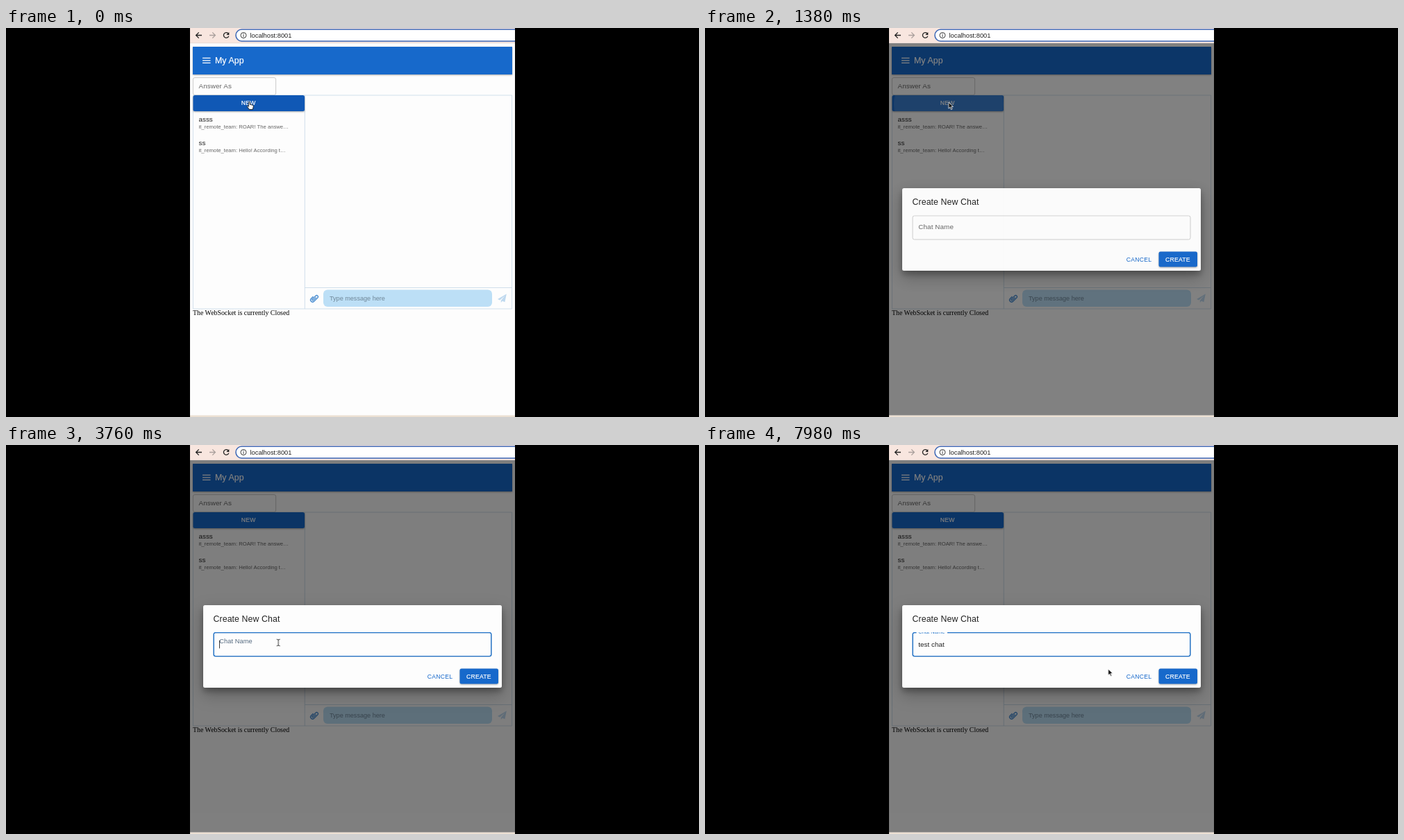
These frames come from a looping animation (998x561 px, 8 s). An HTML page:

```html
<!DOCTYPE html>
<html lang="en">
<head>
<meta charset="utf-8">
<title>Create chat dialog</title>
<style>
  html, body { margin: 0; width: 100%; height: 100%; overflow: hidden; background: #000; }
  svg { display: block; width: 998px; height: 561px; }
  text { font-family: "Liberation Sans", Arial, sans-serif; font-size: 9.87px; fill: #222; white-space: pre; }
  .title { font-size: 12.34px; letter-spacing: .0075em; }
  .button { font-size: 8.64px; letter-spacing: .02857em; }
  .light { fill: #fff; stroke: #fff; stroke-width: .2px; }
  .preview { font-size: 7.7px; fill: #666; }
  .address { font-size: 9.3px; }
  .hint { font-size: 9.1px; fill: #6f8798; }
  .status { font-family: "Liberation Serif", Times, serif; fill: #000; }
  .label { letter-spacing: .0094em; fill: #666; }
  .line { fill: none; stroke: #c6d8e7; stroke-width: .8px; }
  .icon { fill: none; stroke: #222; stroke-width: 1.3px; }
  .raised { filter: drop-shadow(0 1px 1px #0005); }
  .sheet { filter: drop-shadow(0 5px 4px #0004) drop-shadow(0 8px 11px #0004); }
  #notch { transform-box: fill-box; transform-origin: left; }
</style>
</head>
<body>
<svg viewBox="0 0 998 561">
  <defs>
    <clipPath id="window"><rect x="265" width="468" height="561"/></clipPath>
    <clipPath id="newButton"><rect x="269.5" y="97" width="160.5" height="23" rx="2.5"/></clipPath>
    <clipPath id="content"><rect x="284" y="270.2" width="430" height="45"/></clipPath>
  </defs>
  <rect width="998" height="561" fill="#000"/>
  <g clip-path="url(#window)">
    <rect x="265" width="468" height="561" fill="#fdfdfd"/>

    <!-- browser bar -->
    <rect x="265" width="468" height="22" fill="#f8e6df"/>
    <rect x="265" y="21.3" width="468" height=".8" fill="#e3d9d4"/>
    <rect x="265" y="558.5" width="468" height="3" fill="#ece0d3"/>
    <rect x="331" y="2" width="440" height="17" rx="8.5" fill="#fff" stroke="#3b66b5" stroke-width="1.5"/>
    <path class="icon" d="M282 10.5H273.8M277.7 6.4L273.6 10.5L277.7 14.6"/>
    <path class="icon" style="stroke:#aaa09d" d="M293 10.5H301.2M297.3 6.4L301.4 10.5L297.3 14.6"/>
    <path class="icon" d="M320 7.8A3.8 3.8 0 1 0 320.8 11.6"/>
    <path d="M321.3 6V10H317.3Z" fill="#222"/>
    <g class="icon" style="stroke-width:.9px">
      <circle cx="342" cy="10.5" r="4"/><path d="M342 9.8V12.8M342 8V9"/>
    </g>
    <text class="address" x="351.5" y="13.7">localhost:8001</text>

    <!-- app -->
    <rect class="raised" x="269" y="27" width="460" height="40" fill="#1769cb"/>
    <path class="icon" style="stroke:#fff" d="M283 43.3H294.5M283 46.8H294.5M283 50.3H294.5"/>
    <text class="title light" x="301" y="51">My App</text>
    <rect x="269.4" y="71.6" width="119.2" height="25" rx="2.5" fill="none" stroke="#bdbdbd" stroke-width=".8"/>
    <text class="label" x="277.5" y="87.2">Answer As</text>
    <path class="line" d="M269.4 97H728.6V405H269.4ZM430.3 97V405M430.3 374.5H728.6"/>
    <rect id="newFill" class="raised" x="269.5" y="97" width="160.5" height="23" rx="2.5" fill="#1058b5"/>
    <text class="button light" x="338.8" y="111.2">NEW</text>
    <g clip-path="url(#newButton)">
      <g transform="translate(351 110)"><circle id="ripple" r="84" fill="#fff"/></g>
    </g>
    <text x="277.5" y="135.4">asss</text>
    <text class="preview" x="277.5" y="144.7">it_remote_team: ROAR! The answe…</text>
    <text x="277.5" y="169.4">ss</text>
    <text class="preview" x="277.5" y="178.7">it_remote_team: Hello! According t…</text>
    <rect x="457" y="377.5" width="243" height="24.5" rx="6" fill="#bcdff6"/>
    <text class="hint" x="466" y="392.6">Type message here</text>
    <g transform="translate(443.8 390) rotate(45)" fill="none" stroke="#4c8fd2" stroke-width="1.4">
      <path d="M-2.9 -1V3.2A2.9 2.9 0 0 0 2.9 3.2V-4.2A2 2 0 0 0 -1.1 -4.2V2.6A1 1 0 0 0 .9 2.6V-3"/>
    </g>
    <path d="M720.8 383.5L708 391L711.2 392.4L718.6 386L712.8 393V396L714.8 393.8L718.4 395.3Z" fill="#bfd9ef"/>
    <text class="status" x="269" y="414">The WebSocket is currently Closed</text>

    <rect id="backdrop" x="265" y="22" width="468" height="536.5" fill="#000"/>

    <g id="dialog">
      <rect class="sheet" x="284" y="231" width="430" height="119" rx="2.5" fill="#fdfdfd"/>
      <text class="title" x="298.5" y="255">Create New Chat</text>
      <g clip-path="url(#content)">
        <rect x="299" y="270.8" width="400" height="34.2" rx="2.5" fill="none" stroke="#c2c2c2" stroke-width=".8"/>
        <rect id="focus" x="299.2" y="270.6" width="399.6" height="34" rx="2.5" fill="none" stroke="#1f72c9" stroke-width="1.4"/>
        <rect id="notch" x="304.5" y="269" width="44.5" height="3" fill="#fdfdfd"/>
        <g transform="translate(307.3 279.9)"><text id="label" class="label" y="10.6">Chat Name</text></g>
        <text id="typed" x="307.3" y="290.6">test chat</text>
        <rect id="caret" x="307" y="281.8" width=".9" height="11.5" fill="#222"/>
      </g>
      <text class="button" x="606.8" y="336.6" style="fill:#1769cb">CANCEL</text>
      <rect class="raised" x="653.5" y="322.5" width="55.5" height="22" rx="2.5" fill="#1769cb"/>
      <text class="button light" x="663" y="336.6">CREATE</text>
    </g>

    <g id="pointer">
      <path id="hand" d="M-1.4 .4C-1.4 -.8 .5 -.8 .6 .4V3.3L4.4 4.2C5.6 4.6 5.6 5.6 5.3 7L4.4 10.6H-.3L-3.4 6.6C-3.7 5.6 -2.5 5.1 -1.4 6.4Z" fill="#fff" stroke="#111" stroke-width=".9"/>
      <path id="arrow" d="M0 0V9.2L2.1 7.2L3.6 10.6L5.2 9.9L3.7 6.6H6.6Z" fill="#111" stroke="#fff" stroke-width=".8"/>
      <path id="beam" d="M-2.4 -4.8Q0 -4.8 0 -3.3Q0 -4.8 2.4 -4.8M0 -3.6V3.6M-2.4 4.8Q0 4.8 0 3.3Q0 4.8 2.4 4.8" fill="none" stroke="#222" stroke-width=".9"/>
    </g>
  </g>
</svg>
<script>
const LOOP = 8000;
const STANDARD = 'cubic-bezier(.4,0,.2,1)';
const DECELERATE = 'cubic-bezier(0,0,.2,1)';
const $ = id => document.getElementById(id);

// Each step is [time in ms, value, easing to the next step].
function play(node, property, steps, ease = 'linear') {
  const all = [[0, steps[0][1]], ...steps, [LOOP, steps[steps.length - 1][1]]];
  node.animate(all.map(([time, value, easing = ease]) =>
    ({ offset: time / LOOP, [property]: value, easing })),
    { duration: LOOP, iterations: Infinity });
}
const toggle = (node, property, steps) =>
  play(node, property, [[0, 0], ...steps], 'step-end');
const at = (x, y) => `translate(${x}px, ${y}px)`;

// Dialog opening
const OPEN = 1195;
play($('backdrop'), 'opacity', [[OPEN, 0, STANDARD], [OPEN + 225, .5]]);
play($('dialog'), 'opacity', [[OPEN, 0, STANDARD], [OPEN + 225, 1]]);
play($('newFill'), 'fill', [[OPEN, '#1058b5', STANDARD], [OPEN + 250, '#1769cb']]);
play($('ripple'), 'transform', [[1000, 'scale(0)', STANDARD], [1550, 'scale(1)']]);
play($('ripple'), 'opacity', [[1000, .1], [OPEN, .3, STANDARD], [OPEN + 550, 0]]);

// Field focus
const FOCUS = 3745;
toggle($('focus'), 'opacity', [[FOCUS, 1]]);
play($('notch'), 'transform', [[FOCUS + 50, 'scaleX(0)', DECELERATE], [FOCUS + 150, 'scaleX(1)']]);
play($('label'), 'transform',
  [[FOCUS, at(0, 0) + ' scale(1)', DECELERATE], [FOCUS + 200, at(0, -15.4) + ' scale(.75)']]);
play($('label'), 'fill', [[FOCUS, '#666', DECELERATE], [FOCUS + 200, '#1f72c9']]);

// Typing
const keys = [4860, 5060, 5200, 5380, 5560, 5840, 5980, 6180, 6400];
const typed = $('typed');
const letters = [...typed.textContent];
const caretSteps = [[0, at(0, 0)], ...keys.map((time, i) =>
  [time, at(typed.getSubStringLength(0, i + 1), 0)])];
play($('caret'), 'transform', caretSteps, 'step-end');
typed.textContent = '';
letters.forEach((letter, i) => {
  const span = document.createElementNS(typed.namespaceURI, 'tspan');
  span.textContent = letter;
  typed.append(span);
  toggle(span, 'fillOpacity', [[keys[i], 1]]);
});
const last = keys[keys.length - 1];
toggle($('caret'), 'opacity', [[FOCUS, 1], [FOCUS + 500, 0], [keys[0], 1],
  [last + 500, 0], [last + 1000, 1], [last + 1500, 0]]);

// Pointer
const GLIDE = 'cubic-bezier(.4,0,.4,1)';
play($('pointer'), 'transform', [[2560, at(350.8, 107), GLIDE], [3300, at(392.2, 285)],
  [7420, at(392.2, 285), GLIDE], [7980, at(580.6, 323)]]);
play($('hand'), 'opacity', [[0, 1], [1240, 0]], 'step-end');
toggle($('arrow'), 'opacity', [[1240, 1], [3080, 0], [7710, 1]]);
toggle($('beam'), 'opacity', [[3080, 1], [keys[0], 0], [7420, 1], [7710, 0]]);
</script>
</body>
</html>
```
